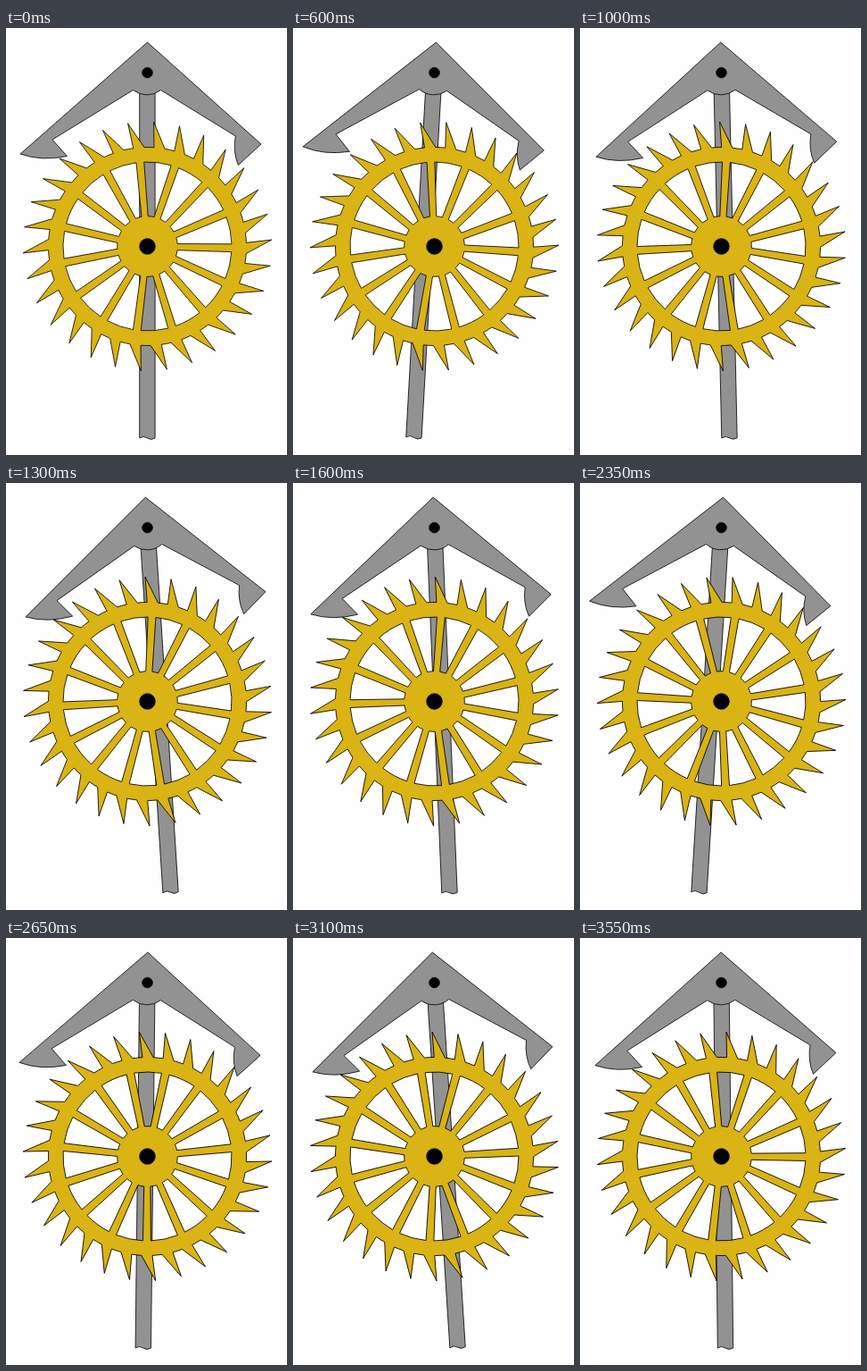
An HTML page that plays this animation: 315x478 px, repeating every 3600 ms.

```html
<!DOCTYPE html>
<html lang="en">
<head>
<meta charset="utf-8">
<title>Anchor escapement</title>
<style>
html, body { margin: 0; width: 100%; height: 100%; overflow: hidden; background: #fefefe; }
svg { display: block; width: 100vw; height: 100vh; }
</style>
</head>
<body>
<svg viewBox="0 0 315 478" stroke="#000" stroke-width="0.8" stroke-linejoin="miter" stroke-miterlimit="3">
  <g id="anchor" fill="#929292">
    <path d="M149.700 60V459q4.350 -3 8.700 0t8.700 0V60Z"/>
    <path d="M158.500 16L286 130L260.300 153.500Q254 138 257.300 121L173.500 69.500A25.200 25.200 0 0 1 142.500 69.500L52 125L68.500 143.500Q40 149.500 16 141Z"/>
  </g>
  <circle cx="158.500" cy="50" r="5.800"/>
  <path id="wheel" fill="#dab314" fill-rule="evenodd"/>
  <circle cx="158.500" cy="244.500" r="8.800"/>
</svg>
<script>
const anchor = document.getElementById('anchor');
const wheel = document.getElementById('wheel');
const LOOP = 3600, HALF = 900, STEP = 50;
const TEETH = 30, SPOKES = 15;
const TIP = 139.5, ROOT = 111, RIM = 94.5, HUB = 33.8;
const FRONT = 0.9, BACK = 7.2; // tooth foot, in degrees past the tip

// Point at radius r, angle in degrees clockwise from the right
function polar(r, deg) {
  const a = deg * Math.PI / 180;
  return (r * Math.cos(a)).toFixed(2) + ' ' + (r * Math.sin(a)).toFixed(2);
}

const arc = (r, deg, sweep) => `A${r} ${r} 0 0 ${sweep} ${polar(r, deg)}`;
const spread = (half, r) => Math.asin(half / r) * 180 / Math.PI;

function wheelPath() {
  let d = 'M' + polar(ROOT, FRONT - 90);
  for (let i = 0; i < TEETH; i++) {
    const a = i * 360 / TEETH - 90;
    d += 'L' + polar(TIP, a) + 'L' + polar(ROOT, a + BACK);
    d += arc(ROOT, a + 360 / TEETH + FRONT, 1);
  }
  d += 'Z';

  const inner = spread(3.6, HUB), outer = spread(4.4, RIM);
  for (let i = 0; i < SPOKES; i++) {
    const a = i * 360 / SPOKES - 1.9, b = a + 360 / SPOKES;
    d += 'M' + polar(HUB, a + inner) + 'L' + polar(RIM, a + outer) + arc(RIM, b - outer, 1);
    d += 'L' + polar(HUB, b - inner) + arc(HUB, a + inner, 0) + 'Z';
  }
  return d;
}

// The wheel drops from one pallet, then recoils against the other
function wheelAngle(t) {
  const u = t % HALF;
  const held = 8.95 - 4.05 * Math.sin(Math.PI * u / HALF);
  const falling = 2.95 + 0.015 * u + 0.000075 * u * u;
  return 6 * Math.floor(t / HALF) + Math.min(held, falling);
}

function draw(now) {
  const t = Math.floor((now % LOOP) / STEP) * STEP;
  const swing = 3.72 * Math.sin(Math.PI * t / HALF);
  anchor.setAttribute('transform', `rotate(${swing} 158.5 50)`);
  wheel.setAttribute('transform', `translate(158.5 244.5) rotate(${wheelAngle(t)})`);
}

wheel.setAttribute('d', wheelPath());
const start = performance.now();
function tick() {
  draw(performance.now() - start);
  requestAnimationFrame(tick);
}
tick();
</script>
</body>
</html>
```
